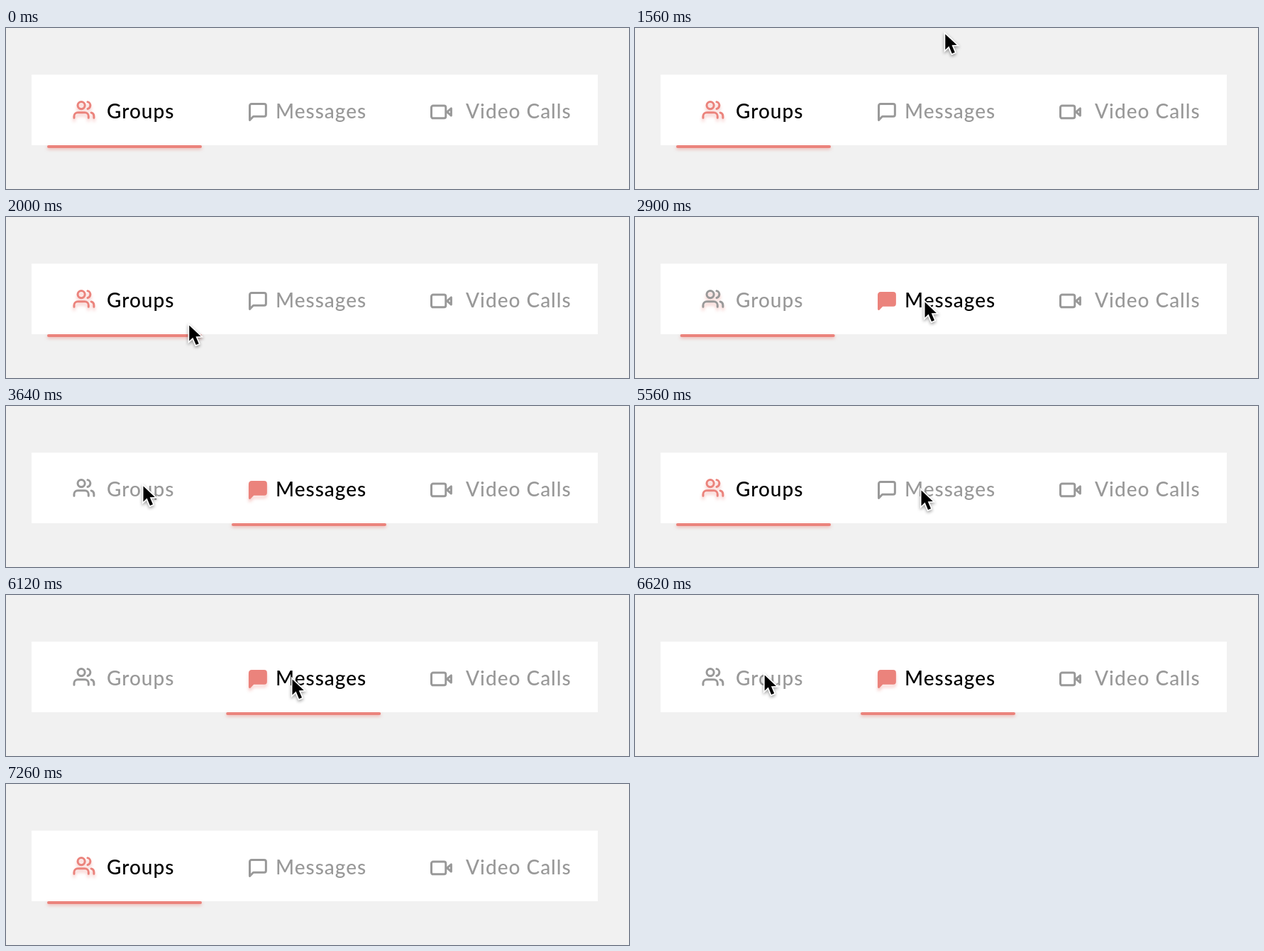
Animation, 878 px wide and 228 px high, one loop 8100 ms. Source, as an HTML page with a canvas:

```html
<!DOCTYPE html>
<html lang="en">
<head>
<meta charset="utf-8">
<title>Tab bar</title>
<style>
  html, body { margin: 0; width: 100%; height: 100%; overflow: hidden; background: #f1f1f1; }
  canvas { display: block; }
</style>
</head>
<body>
<canvas id="stage" width="878" height="228"></canvas>
<script>
const ctx = document.getElementById('stage').getContext('2d');
const LOOP = 8100;
const PAGE = '#f1f1f1', RED = '#eb837c', GRAY = '#999', BLACK = '#000';
const shadowRed = alpha => `rgba(235, 131, 124, ${alpha})`;

// Icons are drawn on a 24-unit grid.
const ICON_SCALE = 1.27, ICON_LINE = 3 / ICON_SCALE;

function usersIcon() {
  const p = new Path2D(), turn = 1.32;
  p.arc(9, 7, 4, 0, 2 * Math.PI);
  p.moveTo(1, 21);
  p.arcTo(1, 15, 5, 15, 4);
  p.arcTo(17, 15, 17, 19, 4);
  p.lineTo(17, 21);
  p.moveTo(23, 21);
  p.arc(19, 19, 4, 0, -turn, true);
  p.moveTo(15 + 4 * Math.cos(turn), 7 - 4 * Math.sin(turn));
  p.arc(15, 7, 4, -turn, turn);
  return p;
}

function messageIcon() {
  const p = new Path2D();
  p.moveTo(3, 21);
  p.arcTo(3, 3, 21, 3, 2);
  p.arcTo(21, 3, 21, 17, 2);
  p.arcTo(21, 17, 7, 17, 2);
  p.lineTo(7, 17);
  p.closePath();
  return p;
}

function videoIcon() {
  const p = new Path2D();
  p.roundRect(1, 5, 16, 14, 2);
  p.moveTo(23, 8);
  p.lineTo(18.5, 12);
  p.lineTo(23, 16);
  p.closePath();
  return p;
}

const TABS = [
  { label: 'Groups', textX: 142, icon: usersIcon(), iconX: 94.7, iconY: 100.7, barX: 58 },
  { label: 'Messages', textX: 380, icon: messageIcon(), iconX: 339.7, iconY: 103.7, barX: 318, solid: true },
  { label: 'Video Calls', textX: 648, icon: videoIcon(), iconX: 598.2, iconY: 103.7 }
];

// Each click selects the other of the first two tabs.
const CLICKS = [2900, 4220, 5860, 6840];
const SLIDE = 350, LEAD = 12;

// The pointer rests between these eased moves.
const ENTRY = { x: 436, y: 5 };
const MOVES = [
  { start: 1560, end: 1940, x: 230, y: 156 },
  { start: 1940, end: 2400, x: 407, y: 117 },
  { start: 3160, end: 3640, x: 192, y: 110 },
  { start: 5060, end: 5400, x: 443, y: 115 },
  { start: 5400, end: 5560, x: 402, y: 116 },
  { start: 6160, end: 6640, x: 181, y: 110 },
  { start: 7000, end: 7260, x: 629, y: 5 }
];
const ARROW = new Path2D('M1.5 3.5V25.5L6.6 20.6L11 31L15 29.3L10.7 19.2L17.8 18.9Z');

const mix = (a, b, k) => a + (b - a) * k;

// The CSS "ease" curve, cubic-bezier(.25, .1, .25, 1).
function ease(x) {
  if (x <= 0 || x >= 1) return x <= 0 ? 0 : 1;
  const bezier = (u, a, b) => 3 * (1 - u) * u * ((1 - u) * a + u * b) + u ** 3;
  let lo = 0, hi = 1;
  for (let i = 0; i < 20; i++) {
    const u = (lo + hi) / 2;
    if (bezier(u, .25, .25) < x) lo = u; else hi = u;
  }
  return bezier(lo, .1, 1);
}

function pointerAt(t) {
  return MOVES.reduce((from, to) => {
    const k = ease((t - to.start) / (to.end - to.start));
    return { x: mix(from.x, to.x, k), y: mix(from.y, to.y, k) };
  }, ENTRY);
}

function setShadow(color, y, blur) {
  ctx.shadowColor = color;
  ctx.shadowOffsetY = y;
  ctx.shadowBlur = blur;
}

function drawTab(tab, active, glow) {
  ctx.save();
  ctx.translate(tab.iconX, tab.iconY);
  ctx.scale(ICON_SCALE, ICON_SCALE);
  ctx.lineWidth = ICON_LINE;
  ctx.lineCap = ctx.lineJoin = 'round';
  ctx.strokeStyle = ctx.fillStyle = active ? RED : GRAY;
  if (glow > 0) setShadow(shadowRed(.45 * glow), 4, 4);
  ctx.stroke(tab.icon);
  if (active && tab.solid) {
    ctx.shadowColor = 'transparent';
    ctx.fill(tab.icon);
  }
  ctx.restore();

  ctx.fillStyle = active ? BLACK : GRAY;
  ctx.fillText(tab.label, tab.textX, 128);
}

function drawBar(x) {
  ctx.save();
  setShadow(shadowRed(.5), 2, 4);
  ctx.fillStyle = RED;
  ctx.beginPath();
  ctx.roundRect(x, 166, 218, 4, 2);
  ctx.fill();
  ctx.restore();
}

function drawPointer({ x, y }) {
  ctx.save();
  ctx.translate(x, y);
  ctx.lineWidth = 3.4;
  ctx.strokeStyle = '#fff';
  setShadow('rgba(0, 0, 0, .4)', 2, 4);
  ctx.stroke(ARROW);
  ctx.shadowColor = 'transparent';
  ctx.fillStyle = BLACK;
  ctx.fill(ARROW);
  ctx.restore();
}

function draw(t) {
  const clicks = CLICKS.filter(time => time <= t);
  const active = clicks.length % 2;
  const moved = clicks.length ? ease((t - clicks.at(-1) + LEAD) / SLIDE) : 1;

  ctx.fillStyle = PAGE;
  ctx.fillRect(0, 0, 878, 228);
  ctx.fillStyle = '#fff';
  ctx.fillRect(36, 66, 798, 100);

  ctx.font = '500 28px Lato, "Open Sans", sans-serif';
  ctx.letterSpacing = '1px';
  TABS.forEach((tab, i) => drawTab(tab, i === active, i === active ? moved : i < 2 ? 1 - moved : 0));
  drawBar(mix(TABS[1 - active].barX, TABS[active].barX, moved));
  if (t >= MOVES[0].start && t < MOVES.at(-1).end) drawPointer(pointerAt(t));
}

const start = performance.now();
function tick() {
  draw((performance.now() - start) % LOOP);
  requestAnimationFrame(tick);
}
tick();
</script>
</body>
</html>
```
